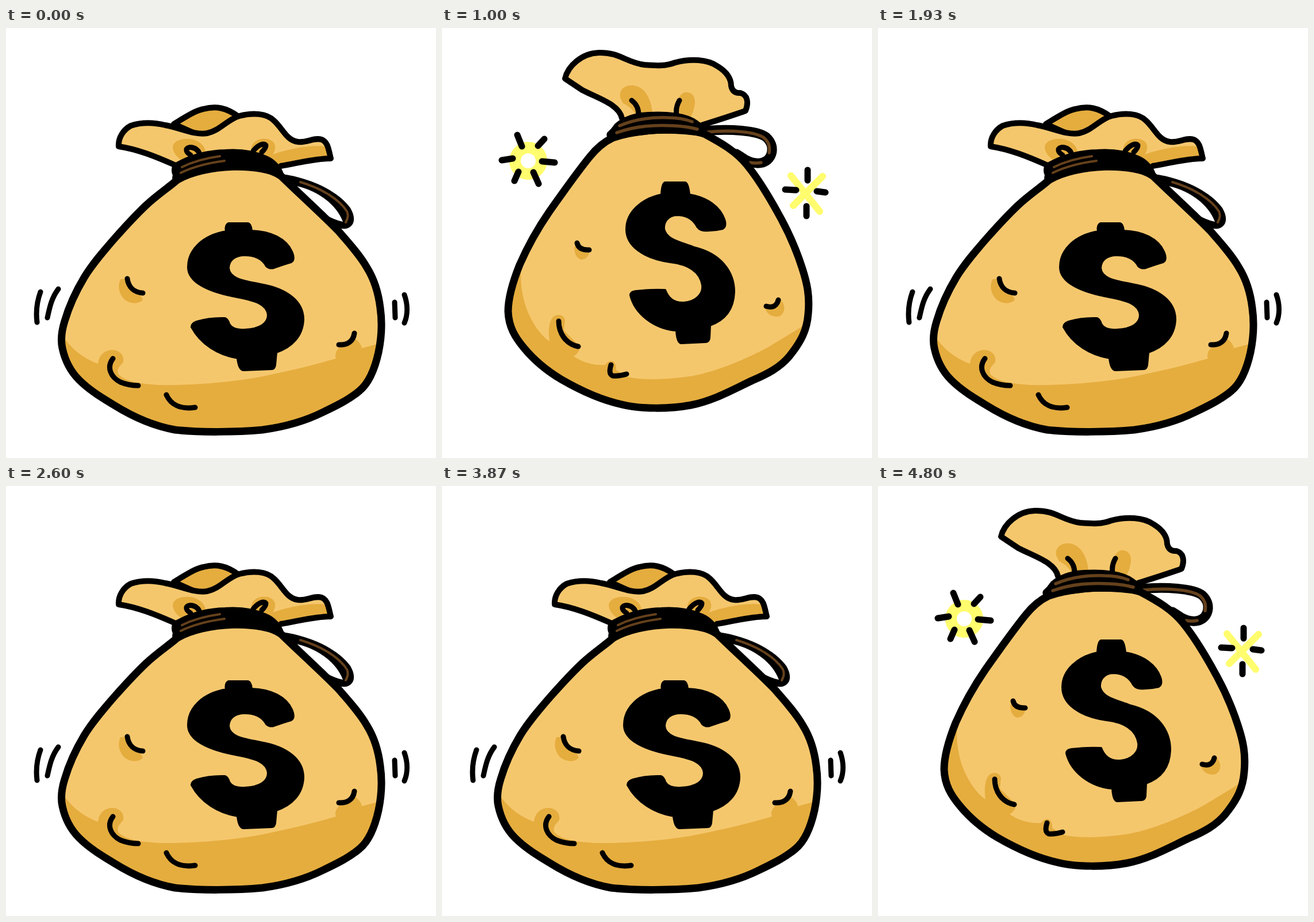
Animation, 748 px wide and 748 px high, one loop 5.07 s. Source, as an HTML page:

```html
<!DOCTYPE html>
<html lang="en">
<head>
<meta charset="utf-8">
<title>Money bag</title>
<style>
html, body { margin: 0; width: 100%; height: 100%; overflow: hidden; background: #fff; }
svg { display: block; width: 748px; height: 748px; overflow: hidden; fill: none; stroke-linecap: round; stroke-linejoin: round; }
.light { fill: #f5c76d; }
.shade { fill: #e5ad3e; }
.ink { fill: #000; stroke: #000; stroke-width: 4; }
.edge { stroke: #000; stroke-width: 13; }
.rim { stroke: #000; stroke-width: 10; }
.line { stroke: #000; stroke-width: 9; }
.rope { stroke: #000; stroke-width: 17; }
.fiber { stroke: #65411c; stroke-width: 4; }
.bold { stroke-width: 5.5; }
.tick { stroke: #000; stroke-width: 11; }
.glow { stroke: #fffc6e; stroke-width: 12; }

/* two poses side by side; the strip jumps between them */
#strip { animation: flip 5070ms step-end infinite; }
@keyframes flip {
  0%, 13.215%, 26.233%, 38.067%, 51.282%, 63.116%, 76.331%, 89.349% { transform: none; }
  6.509%, 19.724%, 31.558%, 44.773%, 57.791%, 69.625%, 82.84%, 94.675%, 100% { transform: translateX(-748px); }
}
</style>
</head>
<body>
<svg viewBox="0 0 748 748">
<defs>
  <path id="squat" d="M297 265C282 278 262 291 243 309C222 329 205 348 189 366C168 390 150 411 136 434C121 459 109 486 102 510C96 529 95 543 98 557C103 580 112 597 127 612C145 630 165 642 188 656C217 674 255 692 294 699C335 704 403 703 446 699C484 694 520 684 552 668C577 656 599 645 615 631C632 617 642 591 648 564C653 540 655 515 651 487C648 462 641 438 628 417C615 394 596 374 579 354C554 328 513 291 479 258C450 234 345 235 297 265Z"/>
  <path id="tall" d="M297 191C282 198 269 209 257 224C235 251 211 285 187 319C167 348 149 380 135 412C123 442 115 468 115 493C116 520 127 538 143 557C162 580 182 596 207 611C238 629 272 646 313 655C345 663 396 663 433 656C473 648 506 629 540 613C566 602 589 590 605 570C625 545 635 525 637 497C640 466 635 444 627 419C616 384 603 356 590 332C570 295 549 261 531 239C512 215 486 200 456 184C420 172 340 176 297 191Z"/>
  <clipPath id="squatClip"><use href="#squat"/></clipPath>
  <clipPath id="tallClip"><use href="#tall"/></clipPath>
</defs>
<g id="strip">

  <g id="squatPose">
    <path class="shade rim" d="M292 167C312 155 328 144 343 141C366 135 383 139 403 153L365 185L330 184Z"/>
    <path class="light" d="M196 206C195 191 204 177 217 170C235 164 256 164 277 169C304 174 329 187 350 183C373 178 385 159 406 153C429 147 453 148 466 161C481 174 488 196 508 198C523 200 536 190 549 194C560 198 561 211 565 227C534 227 505 236 478 240L293 238C259 223 229 211 196 206Z"/>
    <path class="shade" d="M290 207C291 195 310 190 326 194C340 198 347 207 347 217L304 229C297 224 290 216 290 207Z"/>
    <path class="shade" d="M427 214C425 198 440 190 455 193C469 197 472 207 464 220C490 211 525 203 557 206L563 225L478 239L442 218Z"/>
    <path class="rim" d="M293 238C259 223 229 211 196 206C195 191 204 177 217 170C235 164 256 164 277 169C304 174 329 187 350 183C373 178 385 159 406 153C429 147 453 148 466 161C481 174 488 196 508 198C523 200 536 190 549 194C560 198 561 211 565 227C534 227 505 236 478 240"/>
    <path class="line" d="M336 217C331 207 317 205 314 211Q313 216 321 221M430 214C437 205 447 199 452 204Q452 209 445 216"/>
    <path fill="#000" fill-rule="evenodd" d="M480 254C530 261 577 283 599 313C609 330 607 345 592 349C579 351 565 344 550 332L480 270ZM506 275C541 283 575 306 586 337C572 334 560 328 546 318Z"/>
    <path class="fiber" d="M512 268C549 279 580 298 593 319Q597 328 591 338"/>
    <use href="#squat" class="light"/>
    <g clip-path="url(#squatClip)">
      <path class="shade" d="M95 530C112 558 135 575 160 584C162 567 173 560 186 560C199 561 206 570 204 581C199 588 191 593 196 603C207 614 231 619 266 621C319 622 382 617 430 609C480 600 529 588 574 575Q570 566 580 556L608 541Q618 549 619 557L660 546V720H80Z"/>
      <path class="shade" d="M199 437C193 451 198 465 207 473C217 480 230 481 238 473L232 460Q214 452 210 436Z"/>
    </g>
    <use href="#squat" class="edge"/>
    <path class="line" d="M211 436C213 451 223 460 238 461M186 575C174 591 183 608 199 616Q214 622 230 622M279 638C286 654 302 664 329 660M579 551C594 552 604 545 606 531"/>
    <path class="ink" d="M292 238C320 221 350 214 381 213C411 211 433 215 453 224C467 230 478 242 482 257C464 248 449 239 423 238C390 237 362 239 335 247C315 252 303 260 297 268Q289 267 292 256Q288 248 292 238Z"/>
    <path class="fiber" d="M306 242C328 231 350 226 372 223M304 252C326 241 350 235 380 231"/>
    <path class="ink" d="M387 340H421Q426 341 427 353C461 354 487 367 497 389Q503 403 496 407Q482 411 466 417Q458 419 453 414C446 401 434 395 415 395C398 395 387 404 387 418C389 437 414 440 443 446C489 454 517 476 517 507C516 536 497 555 470 564L468 586Q467 593 462 593L413 595Q405 594 403 574C370 569 339 550 323 520Q323 514 332 511Q354 504 381 505Q386 507 388 515C393 524 403 526 416 525C442 524 456 514 456 499C454 480 434 474 403 468C352 459 317 442 317 416C317 386 342 361 383 354Q381 343 387 340Z"/>
    <path class="line" d="M60 459C53 478 52 496 54 512M91 454C79 470 76 486 72 504M676 477L677 504M693 464C699 481 699 499 693 513"/>
  </g>

  <g id="tallPose" transform="translate(748)">
    <path class="light" d="M313 157C308 133 273 123 244 108L214 88C219 66 243 44 273 43C309 42 320 60 352 64C376 66 390 66 406 60C432 53 462 54 480 67C496 77 503 89 503 101Q506 114 519 113C531 116 534 129 528 144C503 153 477 161 452 169Z"/>
    <path class="shade" d="M310 121C307 105 321 98 334 100C352 103 364 121 366 148L338 151Q327 136 315 131Z"/>
    <path class="shade" d="M407 151C406 135 410 116 422 112C434 110 441 119 440 131Q438 146 432 156Z"/>
    <path class="rim" d="M313 157C308 133 273 123 244 108L214 88C219 66 243 44 273 43C309 42 320 60 352 64C376 66 390 66 406 60C432 53 462 54 480 67C496 77 503 89 503 101Q506 114 519 113C531 116 534 129 528 144C503 153 477 161 452 169"/>
    <path class="line" d="M330 126C338 132 342 141 342 151M413 126Q406 138 408 151"/>
    <path class="rope" d="M456 179C500 175 548 178 564 190C581 205 575 229 558 234Q543 238 526 228L512 219"/>
    <path class="fiber bold" d="M462 181C501 177 545 180 560 191Q572 201 569 217M536 234Q546 236 555 234"/>
    <use href="#tall" class="light"/>
    <g clip-path="url(#tallClip)">
      <path class="shade" d="M139 400C134 440 139 474 154 504C163 522 175 537 187 545C184 524 187 508 194 502C202 496 213 499 214 509L212 526L239 553Q241 564 229 571C242 580 263 588 284 586Q290 577 298 580Q304 586 303 595L322 607C358 614 398 611 437 605C482 596 526 577 566 556L645 508V690H90V400Z"/>
      <path class="shade" d="M230 381Q230 399 242 403Q254 402 256 390L238 378Z"/>
      <path class="shade" d="M562 488C566 500 578 504 588 501C598 494 598 480 587 471Z"/>
    </g>
    <use href="#tall" class="edge"/>
    <path class="line" d="M235 374Q238 387 256 386M203 510C203 530 215 550 237 554M294 586Q289 602 297 605Q308 606 321 602M564 484Q581 489 585 473"/>
    <path class="ink" d="M302 168C317 155 334 149 358 148C390 146 425 149 444 163L457 173V187C430 183 405 181 373 182C345 184 318 188 296 193Q286 190 289 183Q296 177 302 168Z"/>
    <path class="fiber bold" d="M309 170C332 160 363 155 393 156Q417 156 435 163M304 182C335 171 370 168 402 170Q426 171 444 176"/>
    <path class="ink" d="M388 269H423Q428 270 430 290C462 295 484 312 491 333Q495 345 488 349Q472 353 455 352Q446 351 442 342C435 331 424 325 408 325C393 326 385 337 386 350C391 369 413 372 439 382C485 393 508 424 508 459C507 490 492 508 466 517L465 539Q464 546 458 546L416 548Q409 547 408 526C369 523 336 497 328 465Q328 459 337 458Q362 455 388 456C394 472 406 479 421 478C443 476 455 462 453 447C449 424 431 411 397 407C350 400 321 379 321 350C321 321 347 297 382 290Q383 270 388 269Z"/>
    <circle cx="150" cy="231" r="23" stroke="#fffc6e" stroke-width="20"/>
    <path class="tick" d="M131 186L139 206M178 193L167 205M104 230L123 227M174 232L196 234M133 250L126 266M159 251L168 271"/>
    <path class="glow" d="M607 257L657 319M662 258L611 309"/>
    <path class="tick" d="M636 247V265M597 281L616 282M652 284L667 286M634 310V327"/>
  </g>

</g>
</svg>
</body>
</html>
```
